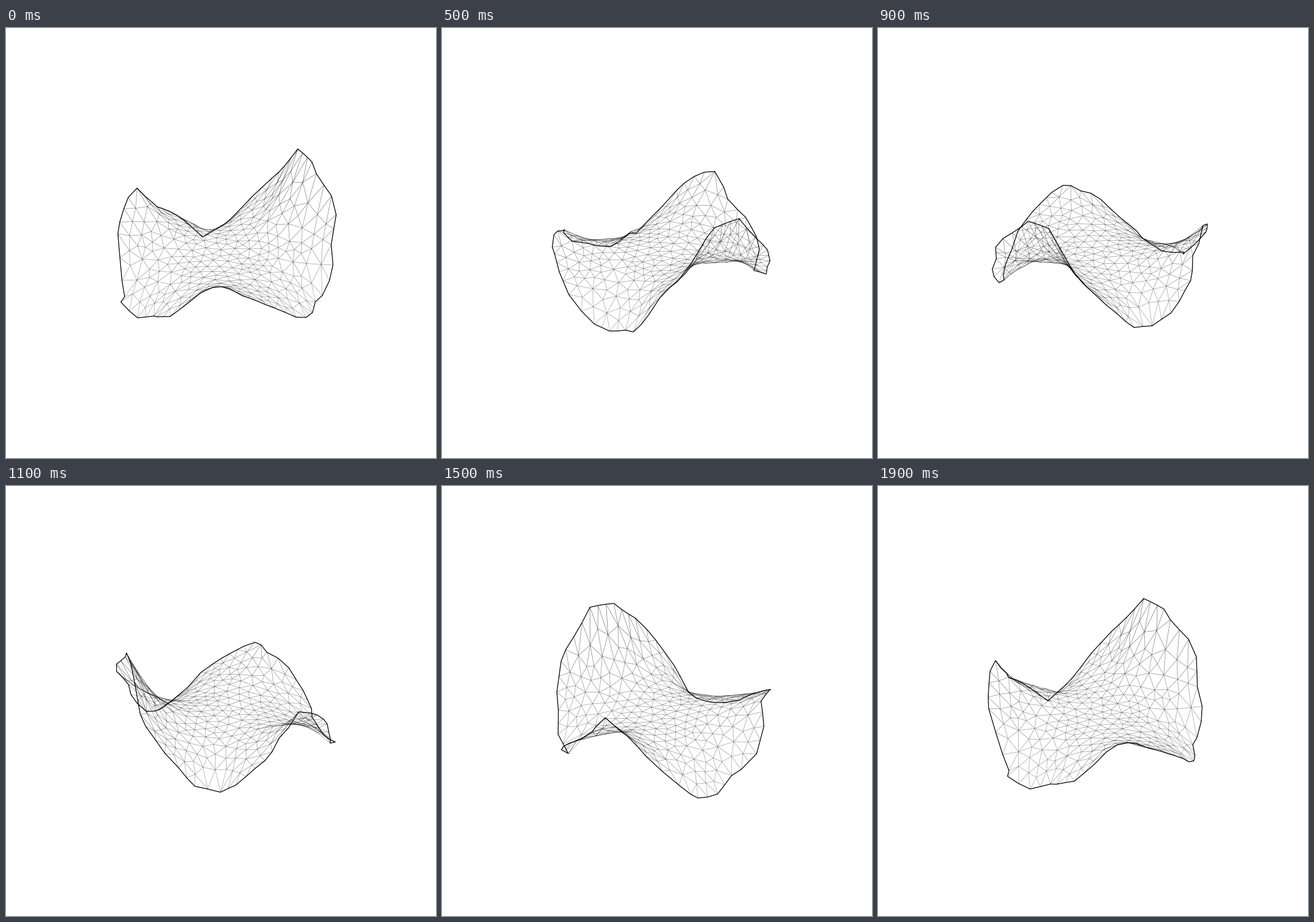
A matplotlib script for the animation above (2 s loop, 748x748 px).

```python
import numpy as np
import matplotlib.pyplot as plt
from matplotlib.animation import FuncAnimation
from matplotlib.collections import LineCollection
from matplotlib.path import Path
from matplotlib.tri import Triangulation

SIZE, DPI = 748, 100
FRAMES, STEP_MS = 20, 100
CENTER = np.array([383, 393])
ELEV = np.radians(30)
CAMERA = 3450      # camera distance in pixels
SPACING = 15       # least distance between mesh vertices

# Ragged rim of the saddle seen from above, clockwise: right, away
RIM = np.array([
    (126, 127), (142, 99), (157, 72), (183, 48), (191, 28), (182, -4),
    (185, -22), (179, -35), (154, -62), (148, -89), (136, -115),
    (100, -159), (81, -169), (67, -176), (38, -185), (27, -189),
    (6, -187), (-7, -181), (-22, -170), (-62, -174), (-94, -161),
    (-117, -134), (-123, -118), (-152, -94), (-182, -60), (-176, -48),
    (-181, -28), (-189, 27), (-186, 40), (-172, 76), (-157, 94),
    (-144, 110), (-131, 117), (-124, 135), (-116, 149), (-89, 168),
    (-73, 173), (-43, 163), (-4, 182), (25, 182), (47, 185), (83, 178),
    (95, 170), (115, 141)], float)

# Height of the rim at even turns, from the far side clockwise
RISE = [-36, 14, 65, 122, 118, 78, 24, -47, -57, -48, -14, 14,
        39, 20, -24, -45, -65, -50, -6, 45, 72, 22, -8, -51]


def split_long(loop, limit=25):
    """Halve every edge of a closed loop that is longer than limit."""
    out = []
    for a, b in zip(loop, np.roll(loop, -1, axis=0)):
        out.append(a)
        if np.linalg.norm(b - a) > limit:
            out.append((a + b) / 2)
    return np.array(out)


def scatter(rim, path, rng):
    """Fill the rim's outline with evenly spread random points."""
    pts = list(rim)
    for p in rng.uniform(-195, 195, (9000, 2)):
        gap = np.hypot(*(np.array(pts) - p).T).min()
        if gap > SPACING and path.contains_point(p):
            pts.append(p)
    return np.array(pts)


def mesh_edges(pts, path):
    tri = Triangulation(*pts.T)
    mid = pts[tri.triangles].mean(axis=1)
    tri.set_mask(~path.contains_points(mid))
    return tri.edges


def relax(pts, fixed, path, rounds=2):
    """Move inner vertices towards the mean of their neighbours."""
    for _ in range(rounds):
        a, b = mesh_edges(pts, path).T
        total, count = np.zeros_like(pts), np.zeros(len(pts))
        for i, j in ((a, b), (b, a)):
            np.add.at(total, i, pts[j])
            np.add.at(count, i, 1)
        pts[fixed:] = (total / np.maximum(count, 1)[:, None])[fixed:]
    return pts


def height(pts, rim):
    """Cubic rise from the flat centre up to the rim's height."""
    full = 2 * np.pi
    ang, turn = np.arctan2(*pts.T), np.arctan2(*rim.T)
    reach = np.interp(ang, turn, np.hypot(*rim.T), period=full)
    knots = np.linspace(0, full, len(RISE), endpoint=False)
    top = np.interp(ang, knots, RISE, period=full)
    return top * (np.hypot(*pts.T) / reach) ** 3


def project(pts, angle):
    """Turn about the upright axis, then view in perspective."""
    x, y, z = pts.T
    c, s = np.cos(angle), np.sin(angle)
    x, y = x * c + y * s, y * c - x * s
    near = z * np.tan(ELEV) - y * np.cos(ELEV)
    scale = CAMERA / (CAMERA - near)
    return CENTER + np.column_stack(
        [x * scale, -(y * np.sin(ELEV) + z) * scale])


rim = split_long(RIM)
n = len(rim)
outline = Path(rim)
flat = relax(scatter(rim, outline, np.random.default_rng(5)), n, outline)
edges = mesh_edges(flat, outline)
z = height(flat, rim)
verts = np.column_stack([flat, z])

# Higher parts of the net are drawn darker
level = np.clip((z[edges].mean(axis=1) + 60) / 150, 0, 1)
shade = np.zeros((len(edges), 4))
shade[:, 3] = 0.4 + 0.22 * level

fig = plt.figure(figsize=(SIZE / DPI, SIZE / DPI), dpi=DPI, facecolor="white")
ax = fig.add_axes([0, 0, 1, 1])
ax.set(xlim=(0, SIZE), ylim=(SIZE, 0))
ax.axis("off")
net = LineCollection([], colors=shade, linewidths=0.45)
ax.add_collection(net)
border, = ax.plot([], [], color="black", lw=0.9, solid_joinstyle="round")


def draw(i):
    p = project(verts, 2 * np.pi * i / FRAMES)
    net.set_segments(p[edges])
    border.set_data(*p[np.r_[:n, 0]].T)
    return net, border


anim = FuncAnimation(fig, draw, frames=FRAMES, interval=STEP_MS,
                     repeat=True, repeat_delay=0)
plt.show()
```
